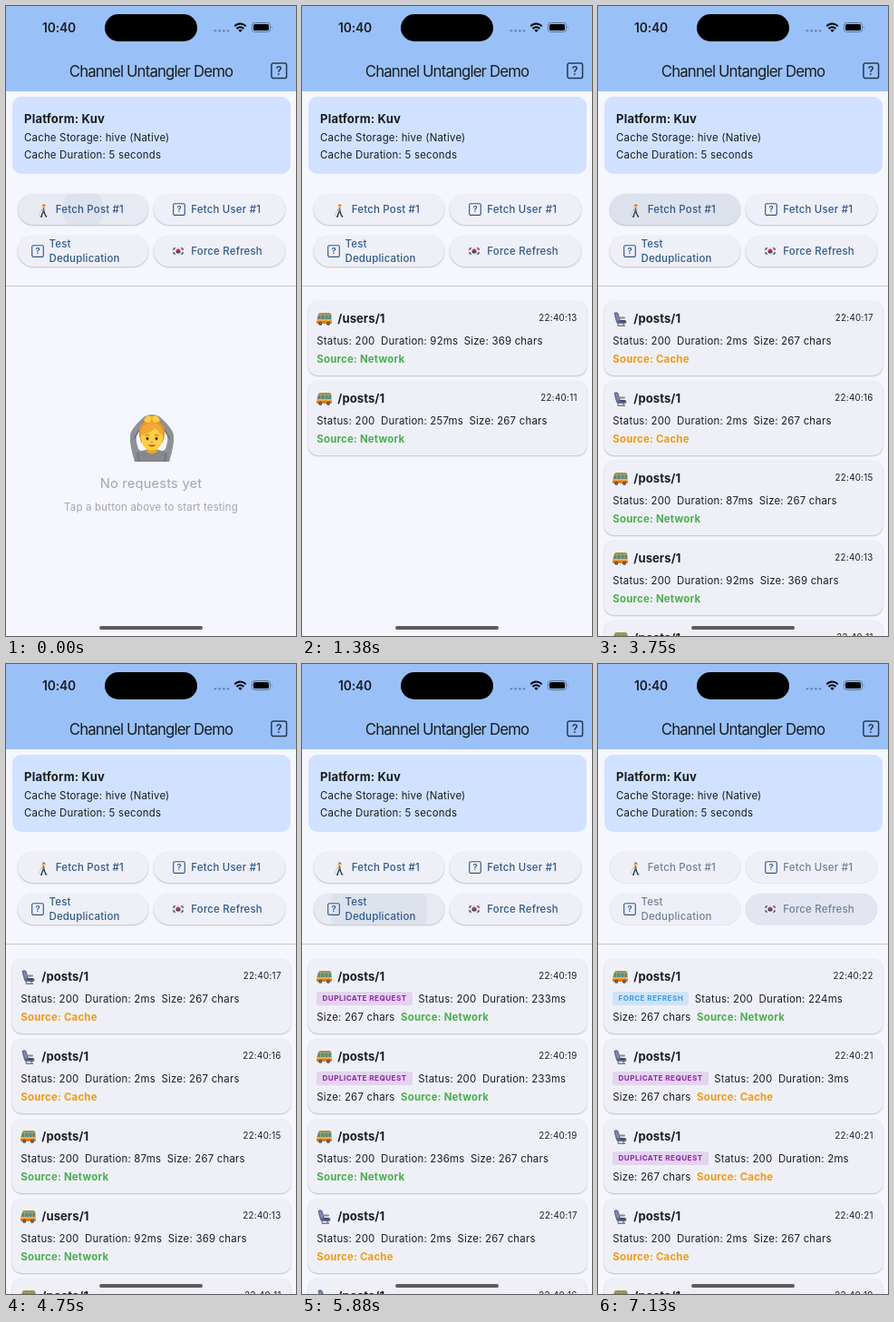
Animation, 320 px wide and 694 px high, one loop 7260 ms. Source, as an HTML page:

```html
<!DOCTYPE html>
<html lang="en">
<head>
<meta charset="utf-8">
<title>Channel Untangler Demo</title>
<style>
  html, body { margin: 0; width: 100%; height: 100%; overflow: hidden; background: #f6f7fe; }
  body { position: relative; font: 11.4px/16.3px Inter, "Noto Sans", sans-serif; letter-spacing: .22px; color: #191c20; }
  body > *, .btn > *, .empty > * { position: absolute; }
  svg { display: block; overflow: visible; }
  .line { line-height: 20px; white-space: nowrap; }
  .bar { left: 0; top: 0; width: 100%; height: 93.5px; background: #9ac1f7; }
  .info { left: 6.5px; top: 100px; width: 307px; height: 85px; border-radius: 10px; background: #d0e2ff; }
  .rule { left: 0; top: 308px; width: 100%; height: 1px; background: #c6c8d0; }
  .btn { width: 144.5px; height: 34px; border-radius: 17px; overflow: hidden; background: #eff0f7; font-weight: 500; }
  .btn svg { left: 0; top: 0; }
  .list { left: 0; top: 309px; width: 100%; height: 385px; overflow: hidden; }
  .card { position: relative; box-sizing: border-box; margin: 15.5px 6.5px -9.5px; height: 82px; padding: 9.8px;
          border-radius: 10px; background: #eff0f7; box-shadow: 0 .8px 1.8px rgba(0,0,0,.28); }
  .head { display: flex; align-items: center; height: 20.5px; margin-bottom: 6.5px; }
  .head b { flex: 1; margin-left: 6px; font-size: 13px; letter-spacing: .1px; }
  .head time { font-size: 9.77px; letter-spacing: .3px; }
  .facts { display: flex; flex-wrap: wrap; gap: 3.25px 6.5px; white-space: nowrap; }
  .chip { height: 15px; line-height: 15px; padding: 0 6.2px; border-radius: 3.3px; font-size: 8.1px; font-weight: 700; letter-spacing: .46px; }
  .home { left: 103px; top: 683px; width: 114px; height: 4px; border-radius: 2px; background: #5b5c60; }
</style>
</head>
<body>
<svg width="0" height="0">
  <symbol id="bus" viewBox="0 0 17 16" overflow="visible">
    <path d="M1.5 4Q2 1.2 4 1.2H14Q16.4 1.2 16.6 4L16.8 12.5H.3V8Z" fill="#f3b43a"/>
    <path d="M2 3.2Q2.4 1 4.2 1H14Q16 1 16.3 3.2Z" fill="#9a9550"/>
    <path d="M1.9 3.6H4.6V8H.8ZM5.2 3.6H8.8V8H5.2ZM9.4 3.6H12.7V8H9.4ZM13.3 3.6H16.2V8H13.3Z" fill="#4f8a90"/>
    <path d="M.2 9.8H16.8V12.8H.2Z" fill="#e5761f"/>
    <circle cx="4.2" cy="12.8" r="1.9" fill="#303238"/><circle cx="13" cy="12.8" r="1.9" fill="#303238"/>
    <circle cx="4.2" cy="12.8" r=".8" fill="#a9adb4"/><circle cx="13" cy="12.8" r=".8" fill="#a9adb4"/>
  </symbol>
  <symbol id="seat" viewBox="0 0 17 16" overflow="visible">
    <path d="M6 12L6.5 15.2H14M12 12.5L12.5 15.2" stroke="#7d818b" stroke-width="1.4" fill="none"/>
    <path d="M1.6 1.8Q2.2 0 4.4.3Q6.6.7 7 3L8.4 8.8L14 9.2Q15.8 9.6 15.4 11.6Q14.8 13.2 13 13L6.4 12.8Q4.4 12.6 3.9 10.4Z" fill="#59648e"/>
    <path d="M2.8 2Q4 1 5.4 2L7.2 9L5.2 10Z" fill="#808bb5"/>
    <path d="M6.6 6.4H13" stroke="#83868f" stroke-width="2" stroke-linecap="round"/>
    <path d="M8.5 10H14.2" stroke="#343c5e" stroke-width="1.4"/>
  </symbol>
  <symbol id="walk" viewBox="0 0 13 15" overflow="visible">
    <g transform="matrix(-1 0 0 1 13 0)">
      <path d="M6.2 8.5L4 13.8H2.8M6.7 8.5L8.2 11.2L8.7 14H10" stroke="#343a4b" stroke-width="1.4" fill="none"/>
      <path d="M6 3.8Q7.8 4 7.6 6L7.4 9H5Z" fill="#4d6680"/>
      <path d="M7 5.2L9.4 7.5" stroke="#e9b345" stroke-width="1.1"/>
      <path d="M9.3 7.4L12.2 14" stroke="#c6c8ce" stroke-width=".8"/>
      <circle cx="6.4" cy="2.4" r="1.8" fill="#efbd48"/><path d="M4.5 2.7Q4.5.3 6.5.4Q8 .5 8 1.5L6 1.7Z" fill="#8a6a3a"/>
    </g>
  </symbol>
  <symbol id="flag" viewBox="0 0 14 10">
    <rect width="14" height="10" rx="1" fill="#e9eaee"/>
    <path d="M4.4 5A2.6 2.6 0 0 1 9.6 5Z" fill="#ce3a4c"/><path d="M4.4 5A2.6 2.6 0 0 0 9.6 5Z" fill="#2b4d92"/>
    <path d="M1.4 3.6L3.6 1.2M10.4 1.2L12.6 3.6M1.4 6.4L3.6 8.8M10.4 8.8L12.6 6.4" stroke="#5b5b60" stroke-width="1.6"/>
  </symbol>
  <symbol id="ask" viewBox="0 0 14 14" overflow="visible">
    <rect x=".7" y=".7" width="12.6" height="12.6" rx="1.6" fill="none" stroke="currentColor" stroke-width="1.15"/>
    <text x="7" y="10.4" text-anchor="middle" font-size="9.5" font-weight="600" letter-spacing="0" fill="currentColor">?</text>
  </symbol>
  <symbol id="person" viewBox="0 0 54 56" overflow="visible">
    <path d="M8 54Q2 35 3 25Q4 17 19 4Q27 0 35 4Q50 17 51 25Q52 35 46 54Z" fill="#8f9196"/>
    <path d="M12 40Q8 28 11 23L20 12H34L43 23Q46 28 42 40L35 45H19Z" fill="#f6f7fe"/>
    <path d="M8 54Q8 43 20 41H34Q46 43 46 54Z" fill="#85878c"/>
    <path d="M7 29L19 9M47 29L35 9M13 54L11 44M41 54L43 44" stroke="#73757a" stroke-width="1.5" fill="none"/>
    <path d="M21 37H33V43Q27 48 21 43Z" fill="#e5a62a"/>
    <path d="M13 25Q11 9 27 8Q43 9 41 25L39 33H15Z" fill="#e5962e"/>
    <ellipse cx="27" cy="27.5" rx="12" ry="14" fill="#ffcf43"/>
    <path d="M14.5 25Q15 11 27 11Q39 11 39.5 25Q34 22 31 17Q24 23 14.5 25Z" fill="#efaa35"/>
    <path d="M18 9Q20 1 27 4Q34 1 36 9Q31 13 27 9Q23 13 18 9Z" fill="#ffcb41"/>
    <path d="M27 4V9" stroke="#dc972a"/>
    <path d="M19.5 25.2Q22 23.5 24 25M30 25Q32 23.5 34.5 25.2" stroke="#a56c25" fill="none"/>
    <ellipse cx="22" cy="28.6" rx="1.5" ry="1.9" fill="#4a3326"/><ellipse cx="32" cy="28.6" rx="1.5" ry="1.9" fill="#4a3326"/>
    <path d="M26 32Q27 33 28 32" stroke="#c98a20" fill="none"/>
    <path d="M22.5 35Q27 36 31.5 35Q27 40 22.5 35Z" fill="#b8473a"/>
  </symbol>
</svg>
<div class="bar"></div>
<svg width="320" height="94" style="left:0;top:0">
  <rect x="109" y="9" width="102" height="30" rx="15"/>
  <g fill="#6d89b2"><circle cx="231" cy="27.3" r="1.4"/><circle cx="235.7" cy="27.3" r="1.4"/><circle cx="240.3" cy="27.3" r="1.4"/><circle cx="245" cy="27.3" r="1.4"/></g>
  <g fill="none" stroke="#000" stroke-width="2"><path d="M252.3 22.2Q258.5 16.8 264.7 22.2M254.6 25Q258.5 21.6 262.4 25"/></g>
  <path d="M256.3 26.6Q258.5 24.8 260.7 26.6L258.5 29Z"/>
  <rect x="271.5" y="18.5" width="20" height="10" rx="3" fill="none" stroke="#5a7294"/>
  <rect x="273" y="20" width="17" height="7" rx="1.8"/><path d="M293 21.8Q294.6 23.5 293 25.2Z" fill="#5a7294"/>
</svg>
<div class="info"></div>
<div class="rule"></div>
<div class="list"></div>
<div class="home"></div>
<script>
const LOOP = 7260, STEP = 125, RAMP = 120;
const BLUE = [48, 89, 140], GREY = [151, 152, 159];
const clamp = v => Math.max(0, Math.min(1, v));
const icon = (id, x, y, w, h, color = '#30598c') =>
  `<svg style="left:${x}px;top:${y}px;color:${color}" width="${w}" height="${h}"><use href="#${id}" width="${w}" height="${h}"/></svg>`;
// One line of text, centred vertically on y
const line = (text, x, y, style = '') =>
  `<div class="line" style="left:${x}px;top:${y - 10}px;${style}">${text}</div>`;
const middle = 'width:320px;text-align:center;';

const add = html => document.body.insertAdjacentHTML('beforeend', html);
add(line('10:40', 40, 24, 'font-size:13.8px;font-weight:600;letter-spacing:-.1px') +
  line('Channel Untangler Demo', 0, 72, middle + 'font-size:16.8px;letter-spacing:-.85px') +
  icon('ask', 292, 62, 18.5, 18.5, '#263a55') +
  line('Platform: Kuv', 20, 123.5, 'font-size:13px;font-weight:700') +
  line('Cache Storage: hive (Native)', 20, 144.5) +
  line('Cache Duration: 5 seconds', 20, 164));

const empty = `<div class="empty">${icon('person', 133.5, 139, 54, 56)}
  ${line('No requests yet', 0, 217, middle + 'font-size:14.65px;color:#a4a5aa')}
  ${line('Tap a button above to start testing', 0, 242.5, middle + 'color:#a4a5aa')}</div>`;

const buttons = [
  [12.5, 207, icon('walk', 22, 10.5, 13, 15) + line('Fetch Post #1', 42.3, 17)],
  [163, 207, icon('ask', 21, 10, 14, 14) + line('Fetch User #1', 41.3, 17)],
  [12.5, 252.5, icon('ask', 15, 10, 14, 14) + line('Test', 35, 9.5) + line('Deduplication', 35, 25.5)],
  [163, 252.5, icon('flag', 20, 12.5, 14, 10) + line('Force Refresh', 41.3, 17)]
].map(([x, y, html]) => {
  add(`<div class="btn" style="left:${x}px;top:${y}px">${html}</div>`);
  return document.body.lastElementChild;
});

// Each tap: button, press time, loading start, finish time, clock second, requests (oldest first)
const post = (ms, source, chip) => ({ path: '/posts/1', ms, size: 267, source, chip });
const DUP = 'DUPLICATE REQUEST';
const taps = [
  [0, -25, 90, 240, 11, [post(257, 'Network')]],
  [1, 980, 1080, 1140, 13, [{ path: '/users/1', ms: 92, size: 369, source: 'Network' }]],
  [0, 2420, 2525, 2580, 15, [post(87, 'Network')]],
  [0, 3100, 3230, 3230, 16, [post(2, 'Cache')]],
  [0, 3640, 3740, 3740, 17, [post(2, 'Cache')]],
  [2, 4850, 4970, 5120, 19, [post(236, 'Network'), post(233, 'Network', DUP), post(233, 'Network', DUP)]],
  [2, 5800, 5930, 5930, 21, [post(2, 'Cache'), post(2, 'Cache', DUP), post(3, 'Cache', DUP)]],
  [3, 6810, 6930, 7080, 22, [post(224, 'Network', 'FORCE REFRESH')]]
];

function card({ path, ms, size, source, chip }, second) {
  const cached = source === 'Cache';
  const tint = chip === DUP ? '#e3d4ef;color:#9127ae' : '#cfe3f8;color:#3b9cec';
  return `<div class="card">
    <div class="head">${icon(cached ? 'seat' : 'bus', 0, 0, 17, 16)}<b>${path}</b><time>22:40:${second}</time></div>
    <div class="facts">${chip ? `<span class="chip" style="background:${tint}">${chip}</span>` : ''}
      <span>Status: 200</span><span>Duration: ${ms}ms</span><span>Size: ${size} chars</span>
      <b style="color:${cached ? '#f29b13' : '#4bae50'}">Source: ${source}</b></div></div>`;
}

const list = document.querySelector('.list');
let shown = -1;
function showCards(t) {
  const done = taps.filter(tap => tap[3] <= t);
  if (done.length === shown) return;
  shown = done.length;
  list.innerHTML = done.flatMap(tap => tap[5].map(r => card(r, tap[4]))).reverse().join('') || empty;
}

function showButtons(t) {
  let off = 0;
  const press = [];
  for (const [button, down, load, end] of taps) {
    const peak = clamp((Math.min(t, end) - load) / RAMP);
    off = Math.max(off, clamp(peak - Math.max(0, t - end) / RAMP));
    const fade = 1 - clamp((t - end - 20) / 220);
    if (t >= down && fade > 0) press[button] = { radius: 8 + .6 * (t - down), fade };
  }
  const color = BLUE.map((c, i) => Math.round(c + (GREY[i] - c) * off));
  buttons.forEach((el, i) => {
    const ink = a => `rgba(54,90,135,${a * press[i].fade * (1 - .3 * off)})`;
    el.style.color = `rgb(${color})`;
    el.style.boxShadow = `0 ${.8 - .8 * off}px ${1.8 - off}px rgba(0,0,0,${.28 - .12 * off})`;
    el.style.backgroundImage = press[i]
      ? `radial-gradient(circle, ${ink(.06)} ${press[i].radius}px, transparent ${press[i].radius + .7}px), linear-gradient(${ink(.04)}, ${ink(.04)})`
      : 'none';
  });
}

const start = performance.now();
function draw() {
  const elapsed = (performance.now() - start) % LOOP;
  const t = Math.min(57, Math.floor(elapsed / STEP)) * STEP;
  showCards(t);
  showButtons(t);
  requestAnimationFrame(draw);
}
draw();
</script>
</body>
</html>
```
